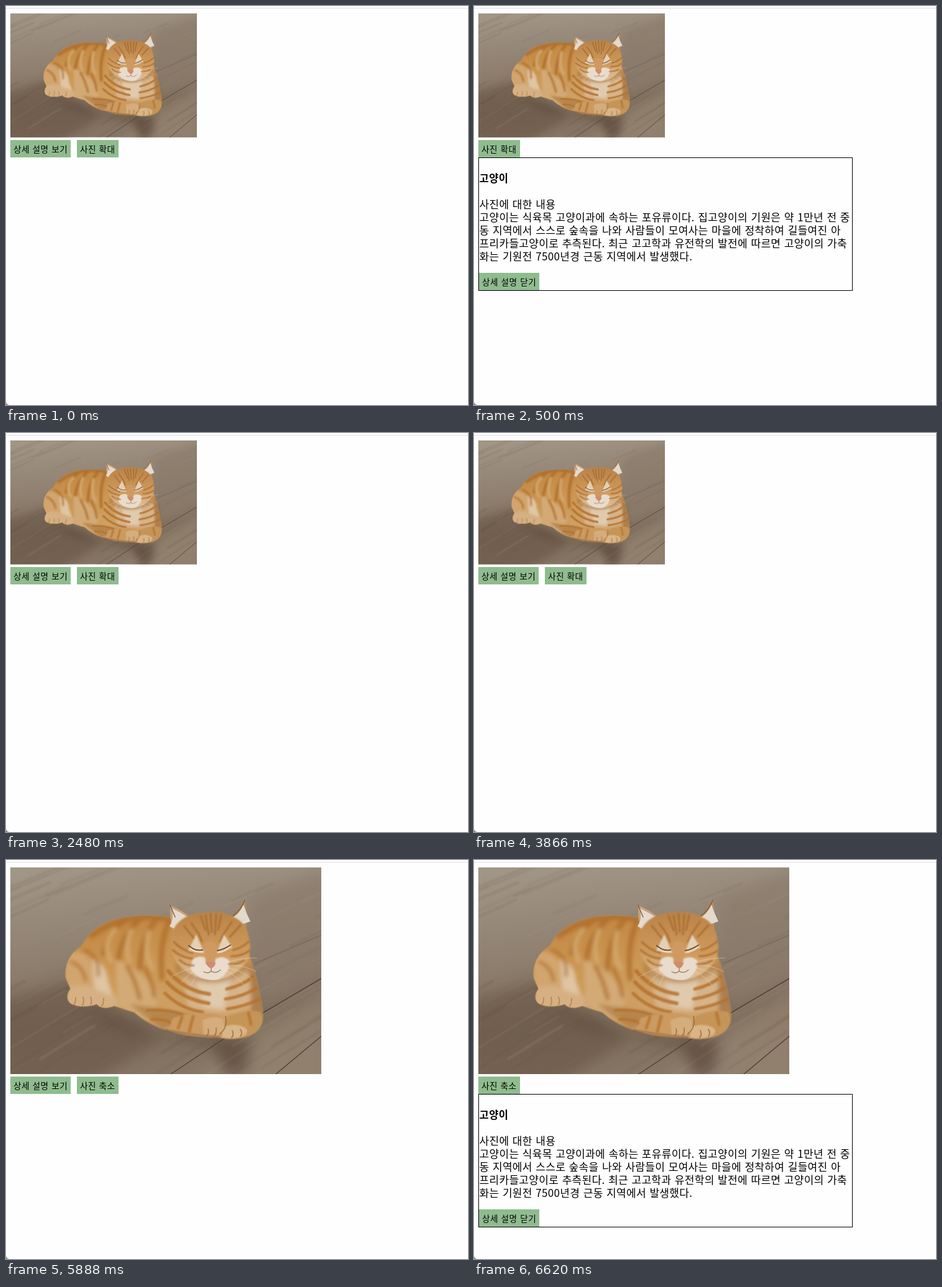
Animation, 743 px wide and 643 px high, one loop 8 s. Source, as an HTML page:

```html
<!DOCTYPE html>
<html lang="ko">
<head>
<meta charset="utf-8">
<title>고양이</title>
<style>
  html, body { margin: 0; width: 100%; height: 100%; overflow: hidden; background: #fefefe; }
  svg { display: block; width: 743px; height: 643px; }
  text { font-family: "Noto Sans CJK KR", "Noto Sans CJK", "Noto Sans CJK JP", sans-serif; fill: #000; font-weight: 350; }
  .label { font-size: 13.6px; letter-spacing: .4px; word-spacing: .6px; }
  .title { font-size: 16.5px; letter-spacing: .5px; font-weight: 700; }
  .body { font-size: 17px; letter-spacing: .32px; word-spacing: .4px; }
  .key { fill: #8fbc8f; }
  .line { fill: none; stroke-linecap: round; stroke-linejoin: round; }
</style>
</head>
<body>
<svg viewBox="0 0 743 643">
  <defs>
    <linearGradient id="floor" x1=".25" y1="0" x2=".4" y2="1">
      <stop offset="0" stop-color="#a19585"/>
      <stop offset=".4" stop-color="#8f8070"/>
      <stop offset=".75" stop-color="#7f6e5d"/>
      <stop offset="1" stop-color="#867564"/>
    </linearGradient>
    <linearGradient id="coat" x1="0" y1="0" x2=".25" y2="1">
      <stop offset="0" stop-color="#c0853f"/>
      <stop offset=".55" stop-color="#cd9a58"/>
      <stop offset="1" stop-color="#cfa36c"/>
    </linearGradient>
    <linearGradient id="face" x1="0" y1="0" x2="0" y2="1">
      <stop offset="0" stop-color="#b98348"/>
      <stop offset=".6" stop-color="#cf9a5b"/>
      <stop offset="1" stop-color="#dfc2a0"/>
    </linearGradient>
    <filter id="soft1" x="-20%" y="-20%" width="140%" height="140%"><feGaussianBlur stdDeviation="1"/></filter>
    <filter id="soft3" x="-20%" y="-20%" width="140%" height="140%"><feGaussianBlur stdDeviation="3"/></filter>
    <filter id="soft12" x="-40%" y="-40%" width="180%" height="180%"><feGaussianBlur stdDeviation="11"/></filter>
    <clipPath id="frame"><rect x="7" y="12" width="500" height="333"/></clipPath>
    <path id="torso" d="M96 190C94 168 104 149 121 139C132 118 152 101 180 95C206 89 242 88 275 95L388 140C394 165 405 192 409 222C415 245 415 262 405 273C392 287 366 290 343 286C318 286 284 283 259 274C242 270 221 259 206 245C193 242 184 238 174 235C163 240 151 239 146 232C132 238 107 237 101 228C96 220 101 211 104 208Z"/>
    <clipPath id="inTorso"><use href="#torso"/></clipPath>
    <path id="head" d="M269 112C277 97 291 87 313 85C332 82 351 83 366 92C382 99 389 110 391 127C396 146 390 164 376 176C361 190 341 195 326 193C305 190 285 179 274 163C262 148 263 128 269 112Z"/>
    <clipPath id="inHead"><use href="#head"/></clipPath>
  </defs>

  <rect width="743" height="3" fill="#fff"/>
  <rect y="3" width="743" height="1" fill="#dedede"/>
  <path d="M0 638Q1 642 5 643H0Z" fill="#8c8c8c"/>

  <g id="photo">
    <g clip-path="url(#frame)">
      <rect x="7" y="12" width="500" height="333" fill="url(#floor)"/>
      <g filter="url(#soft12)">
        <path d="M-20 230L110 190L250 290L120 370H-20Z" fill="#614d3d" opacity=".45"/>
        <path d="M395 60L530 10V175L410 235Z" fill="#8a7b6b" opacity=".7"/>
        <path d="M290 360L520 205V360Z" fill="#9b8b79" opacity=".5"/>
        <path d="M100 232L250 280L400 290L385 345L350 350L335 300L200 275Z" fill="#503d2f" opacity=".6"/>
      </g>
      <g id="grain" class="line" filter="url(#soft1)"></g>
      <g class="line" stroke="#46382d">
        <path d="M507 191L412 247M352 287L265 345" stroke-width="1.5" opacity=".8"/>
        <path d="M507 284L434 345" stroke-width="1.4" opacity=".9"/>
        <path d="M507 121L400 167" stroke-width="2" opacity=".2"/>
      </g>

      <use href="#torso" fill="url(#coat)" filter="url(#soft1)"/>
      <g clip-path="url(#inTorso)">
        <g filter="url(#soft3)">
          <path d="M138 160Q162 166 164 195L180 240H144Z" fill="#dfc5a3"/>
          <path d="M94 150Q122 142 136 162L142 205L98 212Z" fill="#d2a56e"/>
          <path d="M98 207Q128 197 150 211L178 220V240H96Z" fill="#d6b083"/>
          <path d="M176 160Q214 174 247 217L230 259L180 236Z" fill="#d3aa74"/>
          <path d="M283 170Q330 208 386 174L402 229Q354 258 292 236Z" fill="#d7b389"/>
          <path d="M303 188Q331 205 362 188L350 240L319 236Z" fill="#e0caad"/>
          <path d="M272 163Q322 211 388 164L392 178Q332 218 272 181Z" fill="#a2703d" opacity=".45"/>
          <path d="M391 155L418 220L414 270L394 245Z" fill="#a2713f" opacity=".7"/>
          <path d="M198 232L240 238L305 250L252 274Z" fill="#a87437" opacity=".6"/>
          <g class="line" stroke="#b06d29" opacity=".85">
            <path d="M137 122Q196 79 271 98" stroke-width="9"/>
            <path d="M191 98Q163 119 157 151M214 97Q187 119 181 159M240 99Q217 126 215 174M260 104Q246 139 251 191" stroke-width="8"/>
            <path d="M125 145Q151 154 148 186M105 164Q124 171 128 194" stroke-width="5"/>
            <path d="M195 172Q207 190 215 223M224 174Q234 194 239 220" stroke-width="6"/>
          </g>
          <g class="line" stroke="#d6aa70" stroke-width="6">
            <path d="M176 112Q153 137 169 163M201 113Q190 142 199 164M230 116Q221 148 235 174"/>
          </g>
        </g>
        <g class="line" stroke="#b3712f" filter="url(#soft1)" opacity=".85">
          <path d="M261 179Q288 211 327 216M259 197Q284 224 326 231" stroke-width="6"/>
          <path d="M256 215Q281 240 316 245M397 188Q381 202 355 208M403 206Q382 220 353 224M408 224Q384 236 356 240" stroke-width="5"/>
          <path d="M227 242Q260 240 284 249M234 257Q255 255 267 264" stroke-width="4"/>
        </g>
      </g>

      <g filter="url(#soft1)">
        <path d="M268 255Q300 243 342 249Q356 255 352 274Q344 285 319 284Q283 283 262 273Z" fill="#cb9a61"/>
        <path d="M356 252Q384 240 409 245Q418 262 402 277Q383 291 349 287Q340 284 343 276Q351 270 353 259Z" fill="#c59558"/>
        <path d="M349 269Q367 263 379 268Q393 272 385 282Q369 290 347 286Z" fill="#d9b587"/>
        <path d="M316 258Q339 249 349 257Q356 273 340 282L318 281Z" fill="#d4ad7c"/>
        <path d="M258 274Q310 284 343 285" class="line" stroke="#8c6339" stroke-width="3" opacity=".6"/>
      </g>
      <g class="line" stroke="#9d6831" stroke-width="1.8" opacity=".8">
        <path d="M353 252Q357 270 344 280M325 272Q327 280 323 283M338 271Q339 280 335 283M364 275Q367 282 363 286M377 273Q381 279 377 284"/>
        <path d="M112 222Q112 231 109 233M124 221Q126 230 123 234M136 221Q139 229 136 233M157 223Q157 232 154 235" opacity=".7"/>
        <path d="M283 253L277 271M301 252L295 276M390 246L394 265" stroke="#b5762f" stroke-width="5" filter="url(#soft1)"/>
      </g>

      <path d="M264 73Q286 82 299 95L292 112L270 119Q263 99 264 73Z" fill="#c8a17a"/>
      <path d="M267 78Q286 87 299 97L280 115L263 107Q271 95 267 78Z" fill="#e5dace"/>
      <path d="M384 64Q388 84 386 114L372 105L358 94Q375 84 384 64Z" fill="#bd8c58"/>
      <path d="M382 72Q386 85 393 99L376 105L361 95Q375 88 382 72Z" fill="#e3d9cd"/>
      <path d="M264 73L272 92M384 65Q377 82 365 90" class="line" stroke="#765032" stroke-width="1.2"/>

      <use href="#head" fill="url(#face)" filter="url(#soft1)"/>
      <g clip-path="url(#inHead)">
        <g filter="url(#soft1)">
          <path d="M300 160Q318 149 328 166Q346 150 359 162Q362 182 339 194Q315 197 297 177Z" fill="#e9dccd"/>
          <path d="M306 120L319 150L293 146ZM350 119L339 150L364 141Z" fill="#e4d0b5"/>
          <path d="M319 135Q329 126 340 137L336 167H321Z" fill="#cf9a62"/>
          <g class="line" stroke="#a66a30" stroke-width="2.8" opacity=".85">
            <path d="M286 106L302 126M298 102L310 119L315 132M313 90L321 113M321 89L326 120M329 87L331 116M338 88L336 120M346 89L341 113M363 100L350 119L344 132M377 105L360 124"/>
            <path d="M270 132Q281 144 300 150M268 145Q281 157 300 159M279 161Q290 171 302 170M391 131Q379 142 365 145M392 146Q377 156 362 155M383 162Q371 169 358 168"/>
          </g>
        </g>
      </g>
      <g class="line">
        <path d="M294 138Q303 147 316 145M340 146Q351 144 361 137" stroke="#694730" stroke-width="1.8"/>
        <path d="M296 142Q305 150 316 148M341 149Q352 148 359 141" stroke="#ead9c3" stroke-width="2"/>
        <path d="M330 174V179M318 180Q325 184 330 179Q337 184 345 177" stroke="#9b7355" stroke-width="1.2"/>
        <path d="M306 172Q287 176 266 188M307 176Q293 185 281 198M309 178L298 201M354 169Q381 168 402 180M354 173Q380 178 396 192M352 177Q371 187 382 201M355 165Q380 157 403 158" stroke="#eee2d2" stroke-width=".7" opacity=".65"/>
      </g>
      <path d="M321 165Q330 162 337 166Q337 171 330 175Q323 172 321 165Z" fill="#d08a70"/>
    </g>
  </g>

  <g id="controls">
    <g id="show">
      <rect class="key" x="7" width="97" height="28"/>
      <text class="label" x="12" y="20">상세 설명 보기</text>
    </g>
    <g id="zoom">
      <rect class="key" width="67" height="28"/>
      <text id="zoomText" class="label" x="5" y="20"></text>
    </g>
    <g id="panel">
      <rect x="7.5" y="28.5" width="601" height="214" fill="none" stroke="#000"/>
      <text class="title" x="8.5" y="68">고양이</text>
      <g id="lines"></g>
      <rect class="key" x="8" y="214" width="97" height="28"/>
      <text class="label" x="13" y="234">상세 설명 닫기</text>
    </g>
  </g>
</svg>
<script>
const LOOP = 8000;
const scenes = [
  { at: 0, big: false, open: false },
  { at: 500, big: false, open: true },
  { at: 2480, big: false, open: false },
  { at: 4790, big: true, open: false },
  { at: 6620, big: true, open: true }
];
const article = [
  "사진에 대한 내용",
  "고양이는 식육목 고양이과에 속하는 포유류이다. 집고양이의 기원은 약 1만년 전 중",
  "동 지역에서 스스로 숲속을 나와 사람들이 모여사는 마을에 정착하여 길들여진 아",
  "프리카들고양이로 추측된다. 최근 고고학과 유전학의 발전에 따르면 고양이의 가축",
  "화는 기원전 7500년경 근동 지역에서 발생했다."
];
const $ = id => document.getElementById(id);

function add(parent, tag, attrs, content = "") {
  const node = document.createElementNS("http://www.w3.org/2000/svg", tag);
  for (const key in attrs) node.setAttribute(key, attrs[key]);
  node.textContent = content;
  parent.append(node);
}

function drawGrain() {
  let seed = 17;
  const random = () => (seed = seed * 16807 % 2147483647) / 2147483647;
  for (let i = 0; i < 70; i++) {
    const x = random() * 560 - 40, y = 20 + random() * 350;
    const length = 40 + random() * 110;
    const slope = .38 + (y - 12) / 333 * .26;
    add($("grain"), "path", {
      d: `M${x} ${y}l${length} ${-length * slope}`,
      stroke: i % 2 ? "#b5a591" : "#59483a",
      "stroke-width": 1 + random() * 4,
      opacity: .05 + random() * .1
    });
  }
}

function render(time) {
  const { big, open } = scenes.findLast(scene => scene.at <= time);
  $("photo").setAttribute("transform", `translate(7 12) scale(${big ? 1 : .6}) translate(-7 -12)`);
  $("controls").setAttribute("transform", `translate(0 ${big ? 349 : 216})`);
  $("zoom").setAttribute("transform", `translate(${open ? 7 : 114} 0)`);
  $("zoomText").textContent = big ? "사진 축소" : "사진 확대";
  $("show").style.display = open ? "none" : "";
  $("panel").style.display = open ? "" : "none";
}

drawGrain();
article.forEach((line, i) => add($("lines"), "text", { class: "body", x: 8.5, y: 110 + i * 21 }, line));

const start = performance.now();
function tick() {
  render((performance.now() - start) % LOOP);
  requestAnimationFrame(tick);
}
tick();
</script>
</body>
</html>
```
